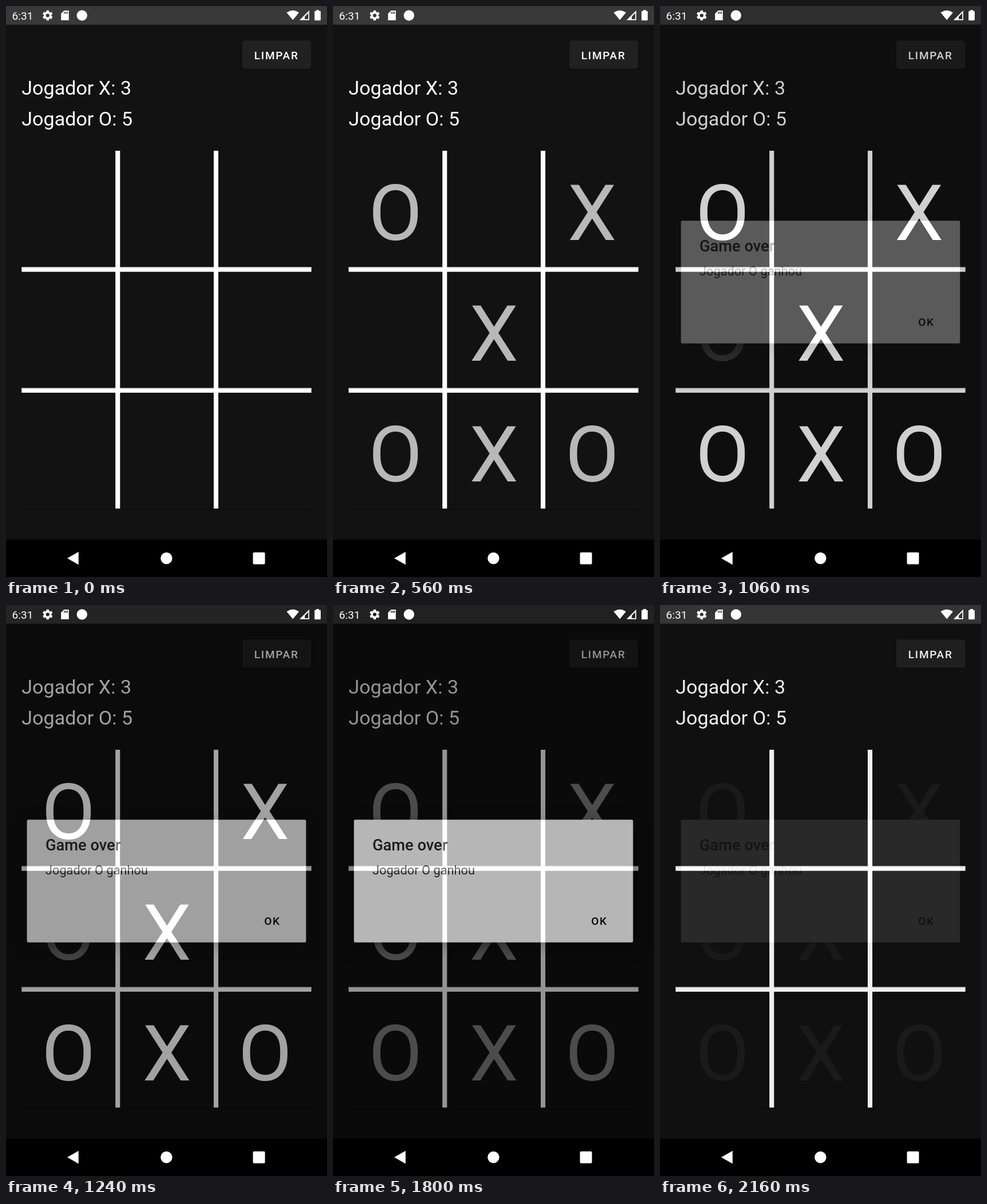
An HTML page with a canvas for the animation above (2.22 s loop, 561 by 998 pixels).

```html
<!DOCTYPE html>
<html lang="pt">
<head>
<meta charset="utf-8">
<title>Jogo da velha</title>
<style>
  html, body { margin: 0; width: 100%; height: 100%; overflow: hidden; background: #121212; }
  canvas { display: block; }
</style>
</head>
<body>
<canvas id="stage" width="561" height="998"></canvas>
<script>
const W = 561, H = 998;
const HOLD = 200, STEP = 60, STEPS = 9;
const PART = HOLD + STEP * STEPS;
const COLS = [109.2, 281.2, 452.8];
const BASES = [408.6, 620, 831.2];

function rect(c, x, y, w, h, color) {
  c.fillStyle = color;
  c.fillRect(x, y, w, h);
}

function round(c, x, y, w, h, r, color) {
  c.fillStyle = color;
  c.beginPath();
  c.roundRect(x, y, w, h, r);
  c.fill();
}

function disc(c, x, y, r, color) {
  c.fillStyle = color;
  c.beginPath();
  c.arc(x, y, r, 0, 7);
  c.fill();
}

function poly(c, color, ...pts) {
  c.fillStyle = color;
  c.beginPath();
  for (let i = 0; i < pts.length; i += 2) c.lineTo(pts[i], pts[i + 1]);
  c.closePath();
  c.fill();
}

function text(c, str, x, y, size, color, weight = 400, spacing = 0) {
  c.font = `${weight} ${size}px Roboto, sans-serif`;
  c.letterSpacing = spacing + 'px';
  c.fillStyle = color;
  c.fillText(str, x, y);
}

function shadow(c, color, blur, dy) {
  c.shadowColor = color;
  c.shadowBlur = blur;
  c.shadowOffsetY = dy;
}

function gear(c, x, y, bar) {
  disc(c, x, y, 6.7, '#fff');
  for (let i = 0; i < 3; i++) {
    c.save();
    c.translate(x, y);
    c.rotate(i * Math.PI / 3);
    round(c, -2.3, -8.8, 4.6, 17.6, 0.8, '#fff');
    c.restore();
  }
  disc(c, x, y, 3.1, bar);
}

function statusBar(c, bar) {
  rect(c, 0, 0, W, 32.7, bar);
  text(c, '6:31', 10.6, 24, 19.1, '#fff');
  gear(c, 72.8, 16.5, bar);

  // memory card
  poly(c, '#fff', 101.5, 8, 109.8, 8, 109.8, 25, 96.2, 25, 96.2, 13.3);
  for (let i = 0; i < 3; i++) rect(c, 101.2 + i * 2.7, 10, 1.5, 3.6, bar);

  disc(c, 132.8, 16.5, 9.2, '#fff');

  // wifi
  c.fillStyle = '#fff';
  c.beginPath();
  c.moveTo(501.3, 24.6);
  c.lineTo(490.5, 11.6);
  c.quadraticCurveTo(501.3, 3.8, 512, 11.6);
  c.fill();

  // signal
  poly(c, '#fff', 513, 24.8, 530, 24.8, 530, 7.8);
  poly(c, bar, 522.2, 18.6, 528.3, 12.4, 528.3, 23, 522.2, 23);

  // battery
  rect(c, 542.2, 7, 4.8, 3, '#fff');
  round(c, 539.2, 8.8, 10.8, 16.4, 1.2, '#fff');
}

function navBar(c) {
  rect(c, 0, 932.7, W, 66, '#000');
  poly(c, '#fff', 107, 965.2, 126.8, 954, 126.8, 976.4);
  disc(c, 280.4, 965.3, 10.2, '#fff');
  round(c, 431.6, 955, 21, 20.8, 2, '#fff');
}

function board(c) {
  rect(c, 27.3, 878.2, 506.4, 3, '#0e0e0e');
  for (const x of [191.2, 363]) rect(c, x, 253, 8.1, 625.4, '#fff');
  for (const y of [456.5, 667.8]) {
    rect(c, 27.3, y, 506.4, 8.1, '#fff');
    for (const x of [27.3, 199.3, 371.1]) rect(c, x, y, x > 300 ? 162.6 : 163.8, 2, '#e4e4e4');
  }
}

function slide(marks, over) {
  const cv = document.createElement('canvas');
  cv.width = W;
  cv.height = H;
  const c = cv.getContext('2d');
  rect(c, 0, 0, W, H, '#121212');

  shadow(c, 'rgba(0,0,0,.4)', 3, 1);
  round(c, 412.8, 60.2, 120.6, 49.6, 5, '#212121');
  shadow(c, 'transparent', 0, 0);
  text(c, 'LIMPAR', 433.8, 92.6, 19.09, '#fff', 500, 1.7);
  text(c, 'Jogador X: 3', 27.3, 155, 34.1, '#fff');
  text(c, 'Jogador O: 5', 27.3, 208.8, 34.1, '#fff');

  board(c);
  c.textAlign = 'center';
  [...marks].forEach((m, i) => {
    if (m !== ' ') text(c, m, COLS[i % 3], BASES[i / 3 | 0], 136.35, '#fff');
  });
  c.textAlign = 'left';

  if (over) {
    rect(c, 0, 0, W, H, 'rgba(0,0,0,.6)');
    shadow(c, 'rgba(0,0,0,.5)', 26, 8);
    round(c, 36.6, 375.3, 487.8, 214.4, 2.7, '#fff');
    shadow(c, 'transparent', 0, 0);
    text(c, 'Game over', 68.9, 428.8, 27.27, '#212121', 500);
    text(c, 'Jogador O ganhou', 68.9, 471, 21.82, '#2b2b2b');
    text(c, 'OK', 451.2, 558.8, 19.09, '#000', 500, 1.7);
  }
  statusBar(c, over ? '#171717' : '#393939');
  navBar(c);
  return cv;
}

const slides = [
  slide('         ', false),
  slide('O X X OXO', false),
  slide('O XOX OXO', true)
];
const ctx = document.getElementById('stage').getContext('2d');

function draw(now) {
  const t = now % (PART * slides.length);
  const i = Math.floor(t / PART);
  const step = Math.floor((t - i * PART - HOLD) / STEP) + 1;
  ctx.globalAlpha = 1;
  ctx.drawImage(slides[i], 0, 0);
  if (step > 0) {
    ctx.globalAlpha = step / (STEPS + 1);
    ctx.drawImage(slides[(i + 1) % slides.length], 0, 0);
  }
}

let start;
function tick(now) {
  start ??= now;
  draw(Math.max(0, now - start));
  requestAnimationFrame(tick);
}
draw(0);
requestAnimationFrame(tick);
</script>
</body>
</html>
```
